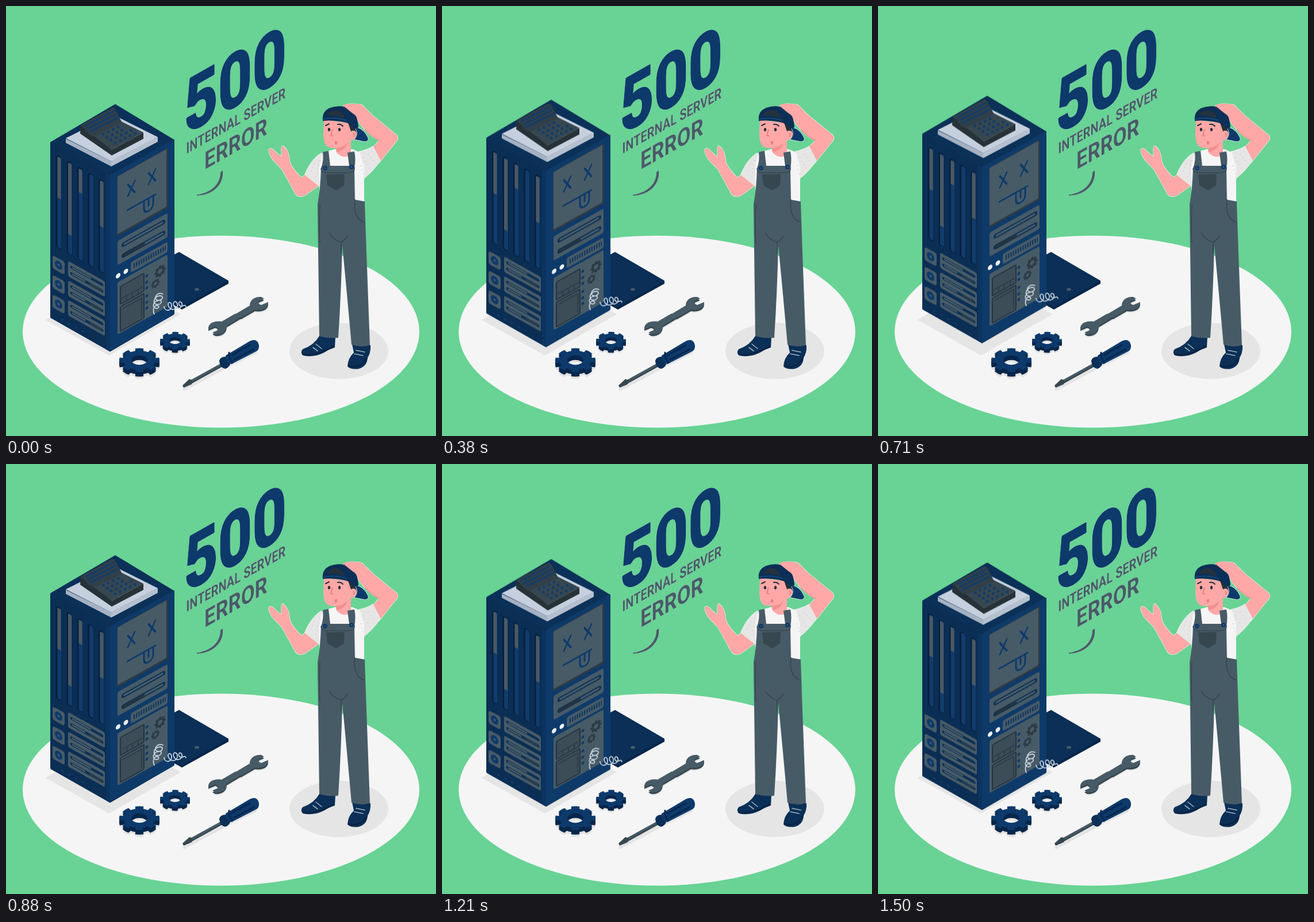
An HTML page without scripts that plays this animation: 748x748 px, repeating every 1.54 s.

```html
<!DOCTYPE html>
<html lang="en">
<head>
<meta charset="utf-8">
<title>500 Internal Server Error</title>
<style>
  html, body { margin: 0; width: 100%; height: 100%; overflow: hidden; background: #68d394; }
  svg { display: block; width: 100%; height: 100%; }
  text { font-family: Roboto, "Liberation Sans", sans-serif; font-weight: 700; }
  .sign { filter: drop-shadow(0 0 .7px #fff); }
  .navy { fill: #0d3a6b; }   .deep { fill: #0b2f56; }
  .grey { fill: #475b67; }   .dark { fill: #37474f; }
  .skin { fill: #ffa8a7; }   .shade { fill: #e5e5e5; }
  .halo { stroke: #e2f5e9; stroke-width: 1.4; paint-order: stroke; }
  .line { fill: none; stroke-linecap: round; stroke-linejoin: round; }

  /* Vertical bob sampled at 37 even steps per loop */
  .server { animation: bob 1540ms -4ms infinite; }
  @keyframes bob {
    0% { transform: translateY(0); animation-timing-function: steps(17, end); }
    45.946% { transform: translateY(-14.57px); animation-timing-function: step-end; }
    48.649% { transform: translateY(-14.57px); animation-timing-function: steps(19, end); }
    100% { transform: translateY(1.5px); }
  }
</style>
</head>
<body>
<svg viewBox="0 0 748 748">
  <defs>
    <g id="cog" fill="none" stroke="currentColor">
      <circle r="21" stroke-width="14"/>
      <circle r="30" stroke-width="10" pathLength="16" stroke-dasharray="1.1 .9" stroke-dashoffset=".55"/>
    </g>
    <g id="flatCog"><use href="#cog" transform="scale(1 .59)"/></g>
    <g id="cogBlock">
      <use href="#flatCog" y="12" color="#e2e2e2"/>
      <g color="#09264a">
        <use href="#flatCog" y="8"/><use href="#flatCog" y="6"/>
        <use href="#flatCog" y="4"/><use href="#flatCog" y="2"/>
      </g>
      <use href="#flatCog" color="#0d3a6b"/>
    </g>
    <g id="slot" class="line">
      <path d="M15 19V171" stroke="#081f3c" stroke-width="10"/>
      <path d="M16 19V171" stroke="#103c6d" stroke-width="7"/>
    </g>
    <g id="drive">
      <rect x="4" y="193" width="21" height="23" rx="4" class="grey"/>
      <ellipse cx="14.5" cy="204.5" rx="6.5" ry="7" class="navy"/>
      <circle cx="14.5" cy="204.5" r="2" class="grey"/>
      <rect x="31" y="188" width="64" height="27" rx="3" class="grey"/>
      <g class="line" stroke-width="5">
        <path d="M37 196H90M37 207H90" stroke="#0c3056"/>
        <path d="M39 196H70M39 207H60" stroke="#4d5f69" stroke-width="2.5"/>
        <path d="M70 207H89" stroke="#303f49" stroke-width="3"/>
      </g>
    </g>
    <path id="halfWrench" d="M399 537L424 522C424 511 434 506 444 507L449 510L440 514Q437 519 444 521L456 516C457 526 446 531 433 529L409 543Z"/>
    <g id="wrench"><use href="#halfWrench"/><use href="#halfWrench" transform="rotate(180 404 539.5)"/></g>
  </defs>

  <rect width="748" height="748" fill="#68d394"/>
  <ellipse cx="374" cy="566.5" rx="345" ry="167" fill="#f5f5f5"/>
  <ellipse cx="579" cy="600" rx="86" ry="49" class="shade"/>
  <path d="M69 546L179 608L304 536L190 474Z" class="shade"/>

  <!-- Detached door -->
  <path d="M301 428L387 478V483L306 528L250 497V455Z" fill="#08264a"/>
  <path d="M301 428L387 478L305 524L250 493V456Z" class="deep"/>
  <ellipse cx="332" cy="493" rx="4" ry="2.5" class="grey"/>

  <!-- Lettering -->
  <g class="sign">
    <text class="navy" font-size="129" letter-spacing="1.7" stroke="#0d3a6b" stroke-width="3.6" stroke-linejoin="round"
          transform="matrix(.79 -.45 0 1 309.5 224.5)">500</text>
    <g class="grey">
      <text font-size="26.5" transform="matrix(.755 -.428 0 1 313.5 257.5)">INTERNAL SERVER</text>
      <text font-size="42" transform="matrix(.825 -.468 0 1 345 285)">ERROR</text>
      <path d="M377 286C380 310 360 329 333 330C331 329 332 328 334 328C357 324 373 310 373 289Z"/>
    </g>
  </g>

  <g class="server">
    <path d="M79 238L190 173L291 234V535L181 599L79 541Z" class="deep" stroke="#0b2f56" stroke-width="4" stroke-linejoin="round"/>
    <path d="M79 237L190 173L291 233L181 294Z" fill="#0b3159"/>

    <g transform="matrix(1 .56 0 1 77 238)">
      <rect x="1" width="103" height="304" fill="#0b2e55"/>
      <rect x="97" width="7" height="305" fill="#0c3461"/>
      <use href="#slot"/><use href="#slot" x="18.5"/><use href="#slot" x="37"/>
      <use href="#slot" x="55.5"/><use href="#slot" x="74"/>
      <path class="line" style="stroke-linecap:butt" stroke="#4a5963" stroke-width="6"
            d="M15.5 17V88M34 17V141M52.5 17V58M89.5 17V96"/>
      <use href="#drive"/><use href="#drive" y="34"/><use href="#drive" y="68"/>
      <path class="line" stroke="#123f70" stroke-width="3.5" d="M21 296h0M33 296h0M45 296h0M57 296h0"/>
    </g>

    <g transform="matrix(1 -.56 0 1 181 294)">
      <rect width="112" height="305" rx="2" fill="#0e3a69"/>
      <rect x="12" y="9" width="89" height="105" rx="3" fill="#2d3b45"/>
      <rect x="13" y="10" width="85" height="100" rx="2" class="grey"/>
      <g class="line" stroke="#0d3a6b" stroke-width="3">
        <path d="M31 34L43 54M43 34L31 54M67 34L79 54M79 34L67 54M30 78H79M59 78V91Q59 100 67 100T75 91V78M67 80V91"/>
      </g>
      <rect x="13" y="122" width="87" height="42" rx="3" class="grey"/>
      <g class="line">
        <path d="M24 134H92M24 153H92" stroke="#0c3056" stroke-width="8"/>
        <path d="M25 134H91M60 153H91" stroke="#4a5d69" stroke-width="3.5"/>
        <path d="M25 153H58" stroke="#26343e" stroke-width="5"/>
      </g>
      <rect x="36" y="172" width="64" height="18" rx="3" class="grey"/>
      <path d="M41 181H97" stroke="#0d335f" stroke-width="8" stroke-dasharray="2 2.2"/>
      <g fill="#f0f2f5"><circle cx="14" cy="183" r="4"/><circle cx="27.5" cy="183" r="4"/></g>
      <rect x="13" y="194" width="87" height="91" rx="3" class="grey"/>
      <g fill="#3c4d58" stroke="#26343f" stroke-width="2">
        <rect x="18" y="204" width="41" height="31" rx="2"/>
        <rect x="18" y="239" width="41" height="43" rx="2"/>
        <path d="M20 226H57M29 227V234M39 227V234M49 227V234M22 245H55V278" fill="none" stroke-width="1.2"/>
      </g>
      <path class="line" stroke="#0d3a6b" stroke-width="5" d="M64 211h0M64 222h0M64 232h0M64 246h0M64 257h0M64 267h0"/>
      <g color="#2c3b45">
        <use href="#cog" transform="translate(87 216) scale(.28)"/>
        <use href="#cog" transform="translate(79 233) scale(.21)"/>
      </g>
    </g>

    <!-- Springs -->
    <path class="line" stroke="#c5d0dc" stroke-width="1.8"
          d="M273 501C264 497 256 507 262 511C270 515 276 505 269 504C258 504 254 516 261 519C270 521 274 511 266 512C255 513 253 526 262 526C267 526 267 520 261 521C255 524 256 533 258 536M275 523C276 532 288 531 288 522C288 512 279 515 283 523C289 532 300 527 298 518C295 510 288 516 293 523C299 530 308 524 306 517C303 511 298 517 302 521C307 525 311 517 313 523"/>

    <!-- Desk calculator on its plate -->
    <path d="M104 231L183 270L264 228V236L183 279L104 238Z" fill="#a5b2c3"/>
    <path d="M183 270L264 228V236L183 279Z" fill="#b5c0cf"/>
    <path d="M104 230L186 189L264 228L183 270Z" fill="#c5cfdd"/>
    <path d="M130 207L152 222L184 250L239 220V231L184 260L129 222Z" fill="#263238"/>
    <path d="M150 224L201 201L239 220L184 250Z" fill="#37474f"/>
    <path d="M130 207L185 177Q189 177 191 182L202 203L153 227Q143 224 138 215Z" fill="#303f48"/>
    <g class="line" stroke="#123d6d">
      <path d="M139 208L187 183M143 213L190 189M147 218L194 195" stroke-width="3"/>
      <g stroke-width="5" stroke-dasharray="0 9.6">
        <path d="M169 223L201 208"/><path d="M176 228L210 212"/>
        <path d="M183 233L219 216"/><path d="M190 238L226 221"/>
      </g>
    </g>
  </g>

  <!-- Loose parts and tools -->
  <use href="#cogBlock" transform="translate(232 616)"/>
  <use href="#cogBlock" transform="translate(294 582) scale(.74)"/>
  <use href="#wrench" y="4" fill="#e3e3e3"/>
  <use href="#wrench" y="2" class="dark"/>
  <use href="#wrench" y="-1" class="grey"/>
  <g class="line">
    <path d="M310 667L385 627L434 603" stroke="#e3e3e3" stroke-width="5"/>
    <path d="M320 655L378 623" stroke="#37474f" stroke-width="6"/>
    <path d="M320 654L378 622" stroke="#475b67" stroke-width="3"/>
  </g>
  <path d="M307 660L319 649L325 651L323 658L309 664Z" class="dark"/>
  <path d="M371 617Q373 610 382 610L391 617Q391 627 382 631Q372 630 371 617Z" class="deep"/>
  <path d="M382 608L424 583Q437 577 440 590Q441 599 433 602L392 623Q382 621 382 608Z" class="navy"/>
  <path class="line" stroke="#08264b" stroke-width="3" d="M393 607L424 590M397 615L431 597M388 603Q387 614 394 620"/>

  <!-- Technician -->
  <g>
    <path class="skin halo" d="M457 251C457 246 464 247 468 253L478 262C481 257 477 246 481 243C487 246 493 256 493 267C494 276 499 283 514 299L524 290L546 311L521 329C514 333 507 332 503 326L480 284C470 273 459 266 457 251Z"/>
    <path class="skin halo" d="M586 176C590 169 606 169 619 172C626 178 633 187 641 193L679 224C684 229 681 234 676 239L649 273L630 255L649 234C636 228 624 217 615 204C610 194 600 186 586 176Z"/>
    <path d="M649 234C640 229 631 222 625 216M651 270L645 264" class="line" stroke="#ee8c89" stroke-width="1.5"/>
    <path class="halo" fill="#e6e6e6" d="M548 256Q530 268 520 293L546 314L556 280Z"/>
    <path class="halo" fill="#e6e6e6" d="M612 254Q632 249 638 244L651 269Q638 288 620 302L608 280Z"/>
    <path fill="#f5f5f5" d="M550 255L572 249H603L616 255L623 280V340H545V280Z"/>
    <path class="line" stroke="#cecece" stroke-width="1.8" stroke-dasharray="0 7" d="M536 274L529 293M544 269L538 303M630 258L642 272M622 264L633 282M618 278L622 294"/>

    <!-- Head -->
    <path d="M593 200L612 205Q615 222 607 230L594 233Z" fill="#263238"/>
    <path class="skin" d="M553 198L552 225Q553 244 562 246Q568 248 574 247L575 255Q588 268 600 258V234Q609 233 610 223Q609 214 600 218L595 203Z"/>
    <path d="M574 247Q587 246 594 238Q590 252 575 254Z" fill="#f28f8f"/>
    <path class="navy halo" d="M607 211Q623 213 630 231Q629 237 621 235L606 232Q615 223 607 211Z"/>
    <path class="deep" d="M551 200Q549 183 564 177Q581 171 597 178Q612 187 613 211L606 214Q600 204 588 202Q567 198 551 200Z"/>
    <path d="M558 191Q562 181 575 181Q587 183 589 195Q573 190 558 191Z" fill="#24323e"/>
    <path d="M552 197Q572 192 592 199" class="line" stroke="#154679" stroke-width="2"/>
    <path class="skin" d="M586 173Q598 167 616 172L629 187L617 204Q611 191 602 186Z"/>
    <g fill="#263238"><ellipse cx="562" cy="215" rx="2.2" ry="3"/><ellipse cx="580" cy="215" rx="2.2" ry="3"/></g>
    <path class="line" stroke="#263238" stroke-width="2" d="M556 208L562 205M577 206Q583 205 586 209"/>
    <path class="line" stroke="#e5787a" stroke-width="1.6" d="M568 215L565 225L569 226M604 222Q607 222 605 227"/>
    <ellipse cx="574" cy="238" rx="2" ry="3" fill="#e5787a"/>

    <!-- Shoes -->
    <path class="deep" d="M545 574L573 576L572 594Q562 597 553 603Q535 612 517 608Q511 603 516 597Q536 590 545 574Z"/>
    <path class="deep" d="M602 588L634 590Q635 602 629 612Q628 627 614 631Q600 633 594 627Q595 612 605 603Z"/>
    <path class="line" stroke="#9fb0bf" stroke-width="1.6" d="M534 594L542 600M539 588L549 596M606 605L621 608M609 599L624 602"/>
    <path class="line" stroke="#08213f" stroke-width="2" d="M516 606Q537 610 571 592M596 626Q617 632 628 612"/>

    <!-- Overalls -->
    <path class="grey" d="M551 254L561 252L564 278H597L594 255L606 253Q609 266 606 283L607 337L624 340L626 400L633 590Q617 595 601 589Q594 510 585 416Q583 500 578 577Q561 579 545 574L542 345Q547 318 548 282Q553 270 551 254Z"/>
    <path d="M557 293L589 292L588 312L574 321L559 312Z" fill="#37474f"/>
    <path class="line" stroke="#37474f" stroke-width="1.6" d="M548 283Q549 291 560 290H595Q607 290 606 281M607 337Q603 369 623 376M562 395Q570 407 583 411V430M583 411Q590 407 594 400M546 345Q544 385 546 412"/>
    <path class="line" stroke="#0d3a6b" stroke-width="8" d="M555 282h0M601 280h0"/>
    <path class="line" stroke="#5d7386" stroke-width="2" d="M555 282h0M601 280h0"/>
  </g>
</svg>
</body>
</html>
```
